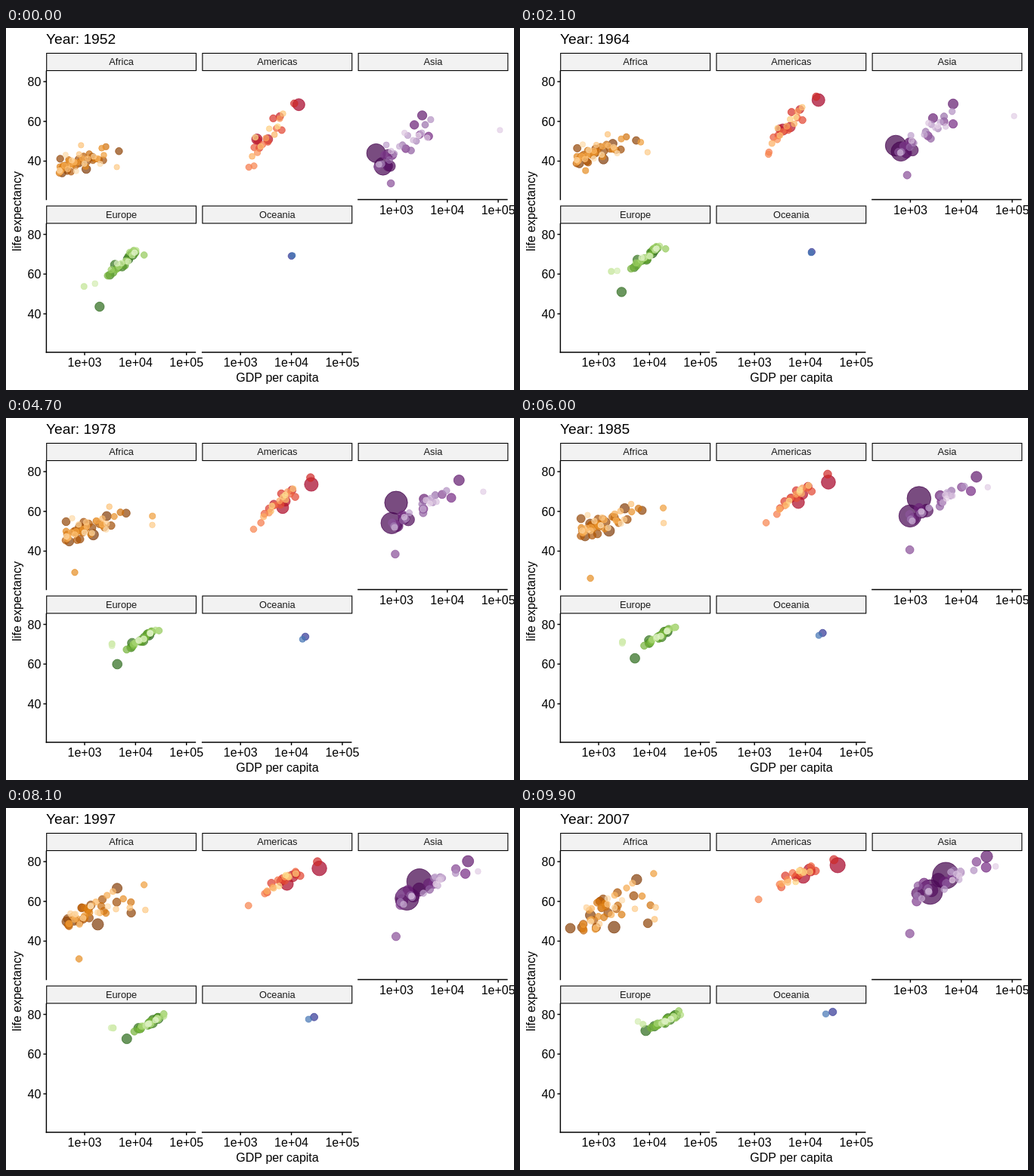
These frames come from a looping animation (672 by 480 pixels, 10000 ms). An HTML page with a canvas:

```html
<!DOCTYPE html>
<html lang="en">
<head>
<meta charset="utf-8">
<title>Life expectancy and GDP per capita</title>
<style>
html, body { margin: 0; width: 100%; height: 100%; overflow: hidden; background: #fff; }
canvas { display: block; width: 672px; height: 480px; }
</style>
</head>
<body>
<canvas id="stage" width="672" height="480"></canvas>
<script>
const FIRST = 1952, LAST = 2007, FRAMES = 100, STEP = 100;
const FONT = '"Liberation Sans", Arial, sans-serif';
const PANEL_W = 197.8, PANEL_H = 171, COL = 206.2, ROW = 202.5, LEFT = 53.4, TOP = 56.5;

// lead: the most populous places; odd: outliers keyed by population rank.
// Each path is start GDP and life, end GDP and life, then way-points (year, GDP, life).
// All other places follow a trend, from/to = [log GDP low, high, life low, high, spread].
// top: largest populations in millions, the rest decay from tail by fade;
// early: share of the final population present at the start.
const panels = [
  { name: 'Africa', col: 0, row: 0, count: 52,
    ramp: ['#7f3b08', '#b35806', '#e08214', '#fdb863', '#fee0b6'],
    top: [135, 80, 76, 65, 44], tail: 42, fade: .93, early: .3,
    lead: [
      [1077, 36, 2014, 47], [1419, 42, 5581, 71], [362, 34, 691, 53],
      [781, 39, 278, 46.5], [4725, 45, 9270, 49]
    ],
    odd: {
      28: [493, 40, 863, 46, 1992, 737, 23.6],
      32: [2388, 43, 12057, 74, 1977, 21951, 57],
      42: [851, 48, 12570, 51],
      44: [4293, 37, 13206, 57, 1977, 21746, 53]
    },
    from: [2.5, 3.45, 36, 43, 6], to: [2.65, 4.1, 47, 66, 10], skew: 1.6,
    lifeBend: gain => 2 + .8 * Math.max(0, 18 - gain),
    gdpBend: gain => .3 * Math.max(0, .3 - gain) },
  { name: 'Americas', col: 1, row: 0, count: 25,
    ramp: ['#a50026', '#d73027', '#f46d43', '#fdae61', '#fee090'],
    top: [301, 190, 109, 44, 40, 33], tail: 29, fade: .87, early: .47,
    lead: [
      [13990, 68.4, 42952, 78.2, 1977, 24073, 73.4],
      [2109, 51, 9066, 72.4, 1977, 6660, 61.5],
      [3478, 51, 11978, 76], [2144, 50.6, 7007, 73],
      [5911, 62.5, 12779, 75], [11367, 69, 36319, 81]
    ],
    odd: { 14: [1840, 37.6, 1202, 61] },
    from: [3.14, 3.85, 42, 61, 8], to: [3.42, 4.25, 69, 77, 4], skew: 1,
    lifeBend: () => 2.5, gdpBend: () => .08 },
  { name: 'Asia', col: 2, row: 0, count: 33,
    ramp: ['#40004b', '#762a83', '#9970ab', '#c2a5cf', '#e7d4e8'],
    top: [1319, 1110, 224, 169, 150, 127], tail: 91, fade: .86, early: .42,
    lead: [
      [400, 44, 4959, 73, 1962, 488, 44.5, 1971, 664, 62.3],
      [547, 37.4, 2452, 64.7, 1982, 856, 56.6],
      [750, 37.5, 3541, 70.7], [685, 43.4, 2606, 65.5], [684, 37.5, 1391, 64],
      [3217, 63, 31656, 82.6, 1977, 16610, 75.4]
    ],
    odd: {
      12: [779, 28.8, 975, 43.8],
      31: [108382, 55.6, 47307, 77.6, 1972, 109348, 67.7, 1982, 31354, 71.3]
    },
    from: [2.6, 3.7, 38, 58, 8], to: [2.95, 4.6, 62, 80, 6], skew: 1.1,
    lifeBend: () => 2.8, gdpBend: () => .04 },
  { name: 'Europe', col: 0, row: 1, count: 30,
    ramp: ['#276419', '#4d9221', '#7fbc41', '#b8e186', '#e6f5d0'],
    top: [82, 71, 61, 61, 58, 40], tail: 38, fade: .88, early: .75,
    lead: [[7144, 67.5, 32170, 79.4], [1969, 43.6, 8458, 71.8, 1977, 4269, 59.5]],
    odd: {
      17: [14734, 69.6, 37506, 81.7],
      23: [974, 53.8, 7446, 75, 1977, 3528, 70, 1992, 2547, 72.2],
      26: [1601, 55.2, 5937, 76.4, 1977, 3533, 69, 1992, 2497, 71.6]
    },
    from: [3.42, 4.02, 59.5, 72, 3], to: [3.95, 4.62, 73, 80.5, 1.4], skew: .85,
    lifeBend: () => 1.6, gdpBend: () => .1 },
  { name: 'Oceania', col: 1, row: 1, count: 2,
    ramp: ['#313695', '#4575b4'],
    top: [20, 4], early: .45,
    lead: [
      [10040, 69.1, 34435, 81.2, 1977, 18334, 73.5],
      [10557, 69.4, 25185, 80.2, 1977, 16234, 72.2]
    ],
    odd: {} }
];

const ctx = document.getElementById('stage').getContext('2d');
const lerp = (a, b, u) => a + (b - a) * u;
const xAt = (col, logGdp) => LEFT + col * COL + (logGdp - 2.2487) * 67.35;
const yAt = (row, life) => TOP + PANEL_H + row * ROW - (life - 20.65) * 2.635;

function seeded(s) {
  return () => (s = (s * 16807) % 2147483647) / 2147483647;
}

function shade(ramp, u) {
  const at = u * (ramp.length - 1), i = Math.min(Math.floor(at), ramp.length - 2);
  const part = (hex, k) => parseInt(hex.substr(1 + 2 * k, 2), 16);
  const rgb = [0, 1, 2].map(k => Math.round(lerp(part(ramp[i], k), part(ramp[i + 1], k), at - i)));
  return `rgba(${rgb}, .7)`;
}

function onTrend([gLow, gHigh, lLow, lHigh, spread], u, skew, rnd) {
  const noise = (rnd() + rnd() - 1) * spread;
  return { gdp: lerp(gLow, gHigh, u ** skew), life: lerp(lLow, lHigh, u) + noise };
}

function pathKeys(path) {
  const keys = [[FIRST, path[0], path[1]]];
  for (let k = 4; k < path.length; k += 3) keys.push(path.slice(k, k + 3));
  keys.push([LAST, path[2], path[3]]);
  return keys.map(([year, gdp, life]) => ({ year, gdp: Math.log10(gdp), life }));
}

function trendKeys({ from, to, skew }, i, rnd) {
  const u = (i * .618034) % 1, v = lerp(u, rnd(), .35);
  return [
    { year: FIRST, ...onTrend(from, u, skew, rnd) },
    { year: LAST, ...onTrend(to, v, skew, rnd) }
  ];
}

function makeDots(panel) {
  const rnd = seeded(4211);
  return Array.from({ length: panel.count }, (_, i) => {
    const path = panel.lead[i] || panel.odd[i];
    return {
      keys: path ? pathKeys(path) : trendKeys(panel, i, rnd),
      pop: panel.top[i] || panel.tail * panel.fade ** (i - panel.top.length),
      color: shade(panel.ramp, i / (panel.count - 1))
    };
  });
}

panels.forEach(p => { p.dots = makeDots(p); });

function place({ keys }, panel, year) {
  let i = 0;
  while (i < keys.length - 2 && year > keys[i + 1].year) i++;
  const a = keys[i], b = keys[i + 1], u = (year - a.year) / (b.year - a.year);
  let gdp = lerp(a.gdp, b.gdp, u), life = lerp(a.life, b.life, u);
  if (keys.length === 2) {
    gdp += panel.gdpBend(b.gdp - a.gdp) * Math.sin(Math.PI * u);
    life += panel.lifeBend(b.life - a.life) * Math.sin(Math.PI * Math.min(1, u ** 1.5 / .87));
  }
  return { x: xAt(panel.col, gdp), y: yAt(panel.row, life) };
}

function drawDots(panel, year) {
  const u = (year - FIRST) / (LAST - FIRST);
  ctx.save();
  ctx.beginPath();
  ctx.rect(LEFT + panel.col * COL, TOP + panel.row * ROW, PANEL_W, PANEL_H);
  ctx.clip();
  ctx.lineWidth = .94;
  for (const dot of panel.dots) {
    const { x, y } = place(dot, panel, year);
    const size = 2 + 10 * Math.sqrt(dot.pop * lerp(panel.early, 1, u) / 1319);
    ctx.beginPath();
    ctx.arc(x, y, 1.4225 * size + .47, 0, 2 * Math.PI);
    ctx.fillStyle = ctx.strokeStyle = dot.color;
    ctx.fill();
    ctx.stroke();
  }
  ctx.restore();
}

function text(str, x, y, size, align = 'center', color = '#000') {
  ctx.font = `${size}px ${FONT}`;
  ctx.textAlign = align;
  ctx.fillStyle = color;
  ctx.fillText(str, x, y);
}

function line(x1, y1, x2, y2) {
  ctx.beginPath();
  ctx.moveTo(x1, y1);
  ctx.lineTo(x2, y2);
  ctx.stroke();
}

function drawFrame({ name, col, row }) {
  const x = LEFT + col * COL, y = TOP + row * ROW, bottom = y + PANEL_H;
  ctx.strokeStyle = '#000';
  ctx.lineWidth = 1.1;
  ctx.fillStyle = '#f2f2f2';
  ctx.fillRect(x + .3, y - 23, PANEL_W, 23);
  ctx.strokeRect(x + .3, y - 23, PANEL_W, 23);
  text(name, x + PANEL_W / 2 + .3, y - 7.5, 12.8, 'center', '#1a1a1a');

  ctx.lineWidth = 1.42;
  if (col === 0) {
    line(x, y, x, bottom + .7);
    for (const life of [40, 60, 80]) {
      const ty = yAt(row, life);
      line(x - 4, ty, x, ty);
      text(life, x - 7, ty + 5.9, 16, 'right');
    }
  }
  if (row === 1 || col === 2) {
    line(x - .7, bottom, x + PANEL_W, bottom);
    for (const e of [3, 4, 5]) {
      const tx = xAt(col, e);
      line(tx, bottom, tx, bottom + 4);
      text(`1e+0${e}`, tx, bottom + 19.3, 16);
    }
  }
}

function draw(now) {
  const frame = Math.floor(now / STEP) % FRAMES;
  const year = lerp(FIRST, LAST, frame / (FRAMES - 1));
  ctx.fillStyle = '#fff';
  ctx.fillRect(0, 0, 672, 480);
  for (const panel of panels) {
    drawDots(panel, year);
    drawFrame(panel);
  }
  text(`Year: ${Math.round(year)}`, 53, 21, 19.2, 'left');
  text('GDP per capita', 359, 469, 16);
  ctx.save();
  ctx.translate(20, 243);
  ctx.rotate(-Math.PI / 2);
  text('life expectancy', 0, 0, 16);
  ctx.restore();
}

let start;
function tick(now) {
  if (start === undefined) start = now;
  draw(now - start);
  requestAnimationFrame(tick);
}
draw(0);
requestAnimationFrame(tick);
</script>
</body>
</html>
```
